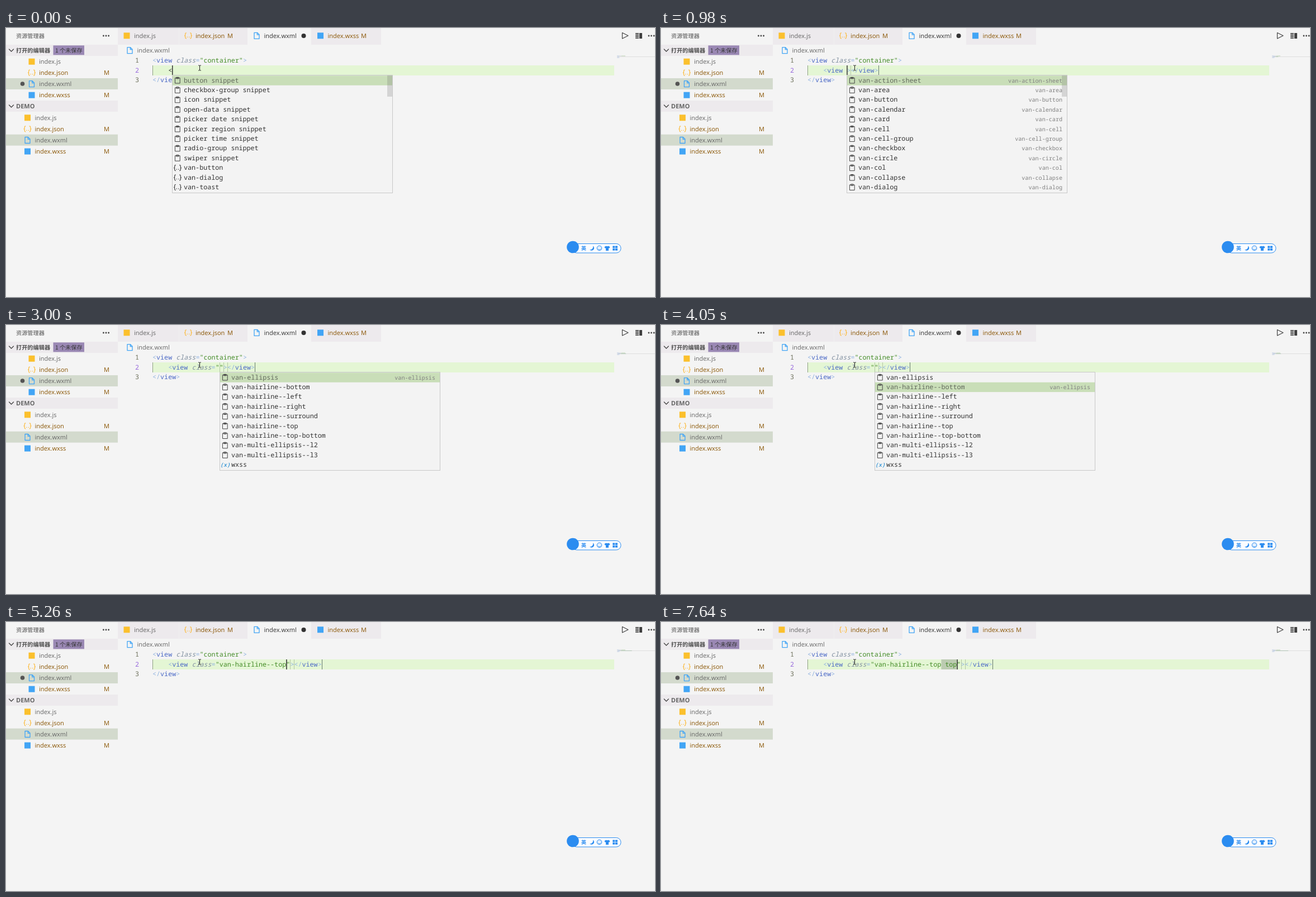
Recreate the animation shown at these times as an HTML page. Size 1161 by 482 pixels, loop 8 s.

```html
<!DOCTYPE html>
<html lang="zh">
<head>
<meta charset="utf-8">
<title>Editor completion</title>
<style>
html, body { margin: 0; width: 100%; height: 100%; overflow: hidden; background: #f4f4f4; }
svg { display: block; width: 1161px; height: 482px; }
text { white-space: pre; text-rendering: geometricPrecision; }
.ui { font: 11px "Open Sans", "Noto Sans", sans-serif; fill: #666; }
.cjk { font: 10.2px "Noto Sans CJK SC", "Noto Sans CJK", sans-serif; fill: #505050; }
.mono { font: 11.73px "Noto Sans Mono", "DejaVu Sans Mono", monospace; fill: #333; }
.detail { font-size: 10.1px; fill: #808080; text-anchor: end; }
.git { fill: #895503; }
.dark { fill: #333; }
.bold { font-weight: 700; }
.mid { text-anchor: middle; }
.punct { fill: #91b3e0; }
.tag { fill: #4b69c6; }
.attr { fill: #8190a0; font-style: italic; }
.str { fill: #448c27; }
.num { fill: #6d705b; }
.active { fill: #9769dc; }
.focus { fill: #62695c; }
.match { fill: #9769dc; font-weight: 700; }
.value { font-size: 10px; font-style: italic; fill: #007acc; }
.ime { font-size: 9px; font-weight: 700; fill: #2b8cf0; }
</style>
</head>
<body>
<svg viewBox="0 0 1161 482"><g id="chrome"></g><g id="editor"></g></svg>
<script>
const LOOP = 8000, CHAR = 7.04, LEFT = 262, ROW = 17.41, POPUP_TOP = 85.3;
const colX = col => LEFT + col * CHAR;

// Drawing helpers
const esc = s => s.replace(/&/g, '&amp;').replace(/</g, '&lt;');
const text = (x, y, s, cls) => `<text x="${x}" y="${y}" class="${cls}">${esc(s)}</text>`;
const rect = (x, y, w, h, fill, more = '') =>
  `<rect x="${x}" y="${y}" width="${w}" height="${h}" fill="${fill}" ${more}/>`;
const circle = (x, y, r, fill) => `<circle cx="${x}" cy="${y}" r="${r}" fill="${fill}"/>`;
const line = (d, color, width = 1.1) =>
  `<path d="${d}" fill="none" stroke="${color}" stroke-width="${width}" stroke-linecap="round" stroke-linejoin="round"/>`;
const at = (x, y, body) => `<g transform="translate(${x} ${y})">${body}</g>`;
const dots = (x, y) => [-4.6, 0, 4.6].map(d => circle(x + d, y, 1.4, '#424242')).join('');

const BRACE = 'M-3.6-5q-1.7 0-1.7 1.8v1.4q0 1.8-1.2 1.8q1.2 0 1.2 1.8v1.4q0 1.8 1.7 1.8';
const braces = color => line(BRACE, color, 1.2) +
  `<g transform="scale(-1 1)">${line(BRACE, color, 1.2)}</g>` +
  line('M-1.8 2.5h.1M1.7 2.5h.1', color, 1.4);

const icons = {
  js: rect(-5.5, -5.5, 11, 11, '#fbc02d'),
  json: braces('#fbbb3c'),
  wxss: rect(-5.5, -5.5, 11, 11, '#42a5f5'),
  wxml: line('M-4.5-5.5h5.5l3.5 3.5v7.5h-9zM.8-5.3v3.7h3.5', '#42a5f5', 1.3),
  clip: line('M-4.2-4.5h8.4v9.5h-8.4zM-2-5.6h4v2.4h-4z', '#424242', 1),
  tag: braces('#424242'),
  cube: line('M0-5.4l5 2.5v5.6l-5 2.7l-5-2.7v-5.6zM-5-2.9l5 2.5l5-2.5M0-.4v5.8', '#007acc', 1.2),
  value: text(0, 3.6, '(x)', 'mono mid value'),
};

// Fixed window parts
const fileColor = name => /json|wxss/.test(name) ? 'git' : '';
const fileRow = (name, x, y, cls = '') => at(x, y, icons[name.split('.')[1]]) +
  text(x + 13, y + 4, name, `ui ${fileColor(name)} ${cls}`);
const chevron = y => line(`M5.5 ${y - 2}l4 4l4-4`, '#424242', 1.3);

function drawChrome() {
  const files = ['index.js', 'index.json', 'index.wxml', 'index.wxss'];
  const header = '#edeaed', selected = '#d3dacd';
  let out = '';
  for (const y of [30, 130]) out += rect(0, y, 200, 20, header) + chevron(y + 10);
  for (const y of [90, 190.7]) out += rect(0, y, 200, 20, selected);
  out += text(18, 17.5, '资源管理器', 'cjk') + dots(179, 14);
  out += text(18, 44, '打开的编辑器', 'cjk bold') + rect(84.5, 31.3, 55.5, 17, '#9a88b4');
  out += text(88, 44, '1 个未保存', 'cjk dark') + text(18, 144, 'DEMO', 'ui bold');
  files.forEach((name, i) => {
    for (const [x, y] of [[46, 60.2 + i * 20], [38.5, 160.8 + i * 20.1]]) {
      out += fileRow(name, x, y);
      if (fileColor(name)) out += text(180, y + 4, 'M', 'ui git mid');
    }
  });
  out += circle(29.5, 100, 3.8, '#555');

  for (const [x, w] of [[200, 109.5], [310, 122], [546, 125]]) out += rect(x, 0, w, 30, header);
  [216, 326, 448.5, 562.5].forEach((x, i) =>
    out += fileRow(files[i], x, 13.8, i === 2 ? 'dark' : ''));
  out += text(401, 17.8, 'M', 'ui git mid') + text(640, 17.8, 'M', 'ui git mid');
  out += circle(532.5, 14, 4, '#333') + fileRow('index.wxml', 221.5, 40.2);

  out += line('M1102.5 8.5v10.5l10.5-5.2z', '#424242', 1.2);
  for (const y of [9, 11.7, 14.4, 17.1]) out += rect(1126, y, 6, 1.7, '#424242');
  out += rect(1133, 9, 5, 10, '#424242') + dots(1154.5, 14);

  const blue = '#2b8cf0';
  out += rect(1012.5, 386.5, 87.5, 16.5, '#fafcff', `rx="8.2" stroke="${blue}"`) + circle(1014, 392.5, 10.8, blue);
  out += text(1033.5, 398, '英', 'cjk mid ime');
  out += `<path d="M1050 390.5a4.5 4.5 0 1 1-6 6.5a5 5 0 0 0 6-6.5z" fill="${blue}"/>`;
  out += line('M1057.3 394.5a4.2 4.2 0 1 1 8.4 0a4.2 4.2 0 1 1-8.4 0M1059.3 396q2.2 2.4 4.4 0M1060 393h.1M1063 393h.1', blue);
  out += `<path d="M1073.5 390.5q2 1.5 4 0l3 1.8l-1.2 2.5l-1.3-.5v4.7h-5v-4.7l-1.3.5l-1.2-2.5z" fill="${blue}"/>`;
  for (const x of [1085.3, 1090]) for (const y of [390.5, 395]) out += rect(x, y, 4, 3.7, blue);
  return out;
}

// Completion lists
const items = (icon, names) => names.split(' ').map(name => ({ icon, name }));
const views = 'view web-view cover-view picker-view picker-view-column scroll-view movable-view';
const snippets = [
  ...['button', 'checkbox-group', 'icon', 'open-data', 'picker date', 'picker region', 'picker time',
    'radio-group', 'swiper'].map(name => ({ icon: 'clip', name: name + ' snippet' })),
  ...items('tag', 'van-button van-dialog van-toast')];
const attributes = items('clip', 'van-action-sheet van-area van-button van-calendar van-card van-cell ' +
  'van-cell-group van-checkbox van-circle van-col van-collapse van-dialog');
const cList = [...items('clip', 'van-calendar van-card van-cell van-cell-group van-checkbox ' +
  'van-checkbox-group van-circle van-col van-collapse van-collapse-item van-swipe-cell'), ...items('cube', 'class')];
const clList = [...items('clip', 'van-calendar van-cell van-cell-group van-col van-collapse van-collapse-item ' +
  'van-circle van-swipe-cell'), ...items('cube', 'class hover-class aria-controls')];
const claList = [...items('cube', 'class hover-class'), ...items('clip', 'van-calendar van-collapse van-collapse-item')];
const classNames = [...items('clip', 'van-ellipsis van-hairline--bottom van-hairline--left van-hairline--right ' +
  'van-hairline--surround van-hairline--top van-hairline--top-bottom van-multi-ellipsis--l2 van-multi-ellipsis--l3'),
  ...items('value', 'wxss')];
const loading = [{ name: '正在加载...' }];

const view = attrs => `<view ${attrs}></view>`;
const topClass = (extra = '') => view(`class="van-hairline--top${extra}"`);

// Each step changes the state left by the one before it
const steps = [
  [0, { code: '<', col: 5, caret: true, list: snippets, query: '', sel: 0, scroll: true,
        broken: false, tail: [], hold: null, detail: '' }],
  [150, { code: '<v', col: 6, query: 'v', broken: true,
          list: items('tag', 'view video van-button van-dialog van-toast navigator ' + views.slice(5)) }],
  [275, { code: '<vi', col: 7, query: 'vi',
          list: items('tag', 'view video van-dialog navigator van-divider van-switch ' + views.slice(5)) }],
  [400, { code: '<vie', col: 8, query: 'vie', scroll: false, list: items('tag', views + ' van-divider') }],
  [550, { code: '<view', col: 9, query: 'view', list: items('tag', views) }],
  [830, { code: view(''), col: 10, list: null, tail: [7, 0] }],
  [980, { list: attributes, query: '', scroll: true, broken: false, detail: 'all' }],
  [1380, { code: view('c'), col: 11, query: 'c', list: cList, hold: 10 }],
  [1630, { code: view('cl'), col: 12, query: 'cl', list: clList, scroll: false }],
  [1750, { code: view('cla'), col: 13, query: 'cla', list: claList }],
  [1870, { code: view('class'), col: 15, query: 'class', list: items('cube', 'class hover-class') }],
  [2400, { caret: false }],
  [2550, { code: view('class=""'), col: 17, caret: true, query: '', list: classNames,
           hold: null, tail: [9, 8, 7, 0], detail: 'van-ellipsis' }],
  [3000, { caret: false }],
  [3530, { caret: true }],
  [4050, { caret: false, sel: 1 }],
  [4450, { caret: true, sel: 2 }],
  [4730, { sel: 3 }],
  [4850, { sel: 4 }],
  [4990, { caret: false, sel: 5 }],
  [5260, { code: topClass(), col: 34, caret: true, list: null }],
  [5690, { col: 35 }],
  [5950, { col: 36 }],
  [6380, { col: 35 }],
  [6530, { col: 34 }],
  [6800, { code: topClass(' '), col: 35, list: loading, sel: -1, hold: 34, tail: [8, 7, 0] }],
  [7080, { code: topClass(' t'), col: 36, list: null }],
  [7640, { code: topClass(' top'), col: 38 }],
];
let last = {};
const states = steps.map(([time, change]) => last = { ...last, ...change, time });

function drawCode(code, startCol, y, broken) {
  let out = '', opened = false;
  for (const { 0: s, index } of code.matchAll(/<\/?|[>=]|"[^"]*"?|[\w-]+/g)) {
    const kind = code === '<' ? '' : /[<>=]/.test(s[0]) ? 'punct' : s[0] === '"' ? 'str'
      : opened && !broken ? 'tag' : 'attr';
    out += text(colX(startCol + index), y, s, 'mono ' + kind);
    opened = s[0] === '<';
  }
  return out;
}

// Indices of the letters in name that match the query
function matchLetters(name, query) {
  const whole = name.indexOf(query);
  if (whole >= 0) return [...query].map((_, i) => whole + i);
  let from = -1;
  return [...query].map(ch => from = name.indexOf(ch, from + 1));
}

function drawPopup({ list, col, query, sel, scroll, detail }) {
  const x = Math.round(colX(col)), message = list === loading;
  const h = Math.round(list.length * ROW + 2);
  let out = rect(x + .5, 84.5, 394, h, '#f3f3f3', 'stroke="#c8c8c8"');
  list.forEach(({ icon, name }, i) => {
    const y = POPUP_TOP + i * ROW, base = y + 12.3, left = x + (icon ? 21 : 5);
    const plain = i === sel ? 'mono focus' : 'mono';
    if (i === sel) out += rect(x + 1, y, 393, ROW, '#c9deb8');
    if (icon) out += at(x + 10, y + 8.7, icons[icon]);
    if (message) out += text(left, base, name, 'cjk');
    else if (!query) out += text(left, base, name, plain);
    else {
      const hits = matchLetters(name, query);
      [...name].forEach((ch, k) =>
        out += text(left + k * CHAR, base, ch, hits.includes(k) ? 'mono match' : plain));
    }
    const note = detail === 'all' ? (icon === 'clip' ? name : '') : i === sel ? detail : '';
    if (note) out += text(x + 386, base, note, 'mono detail');
  });
  if (scroll) out += rect(x + 385, 85, 9, 38, '#646464', 'opacity=".22"');
  return out;
}

function drawMinimap(code, broken) {
  const strip = (from, count, y, fill) => rect(1093 + from * .62, y, count * .62, 1, fill, 'opacity=".6"');
  return rect(1093, 51, 68, 1, '#dedede') +
    strip(0, 6, 49.5, '#8facd8') + strip(6, 7, 49.5, '#b4bcc5') + strip(13, 11, 49.5, '#97bd86') +
    strip(4, Math.min(code.length, 5), 51, '#8facd8') +
    (code.length > 5 ? strip(10, code.length - 6, 51, '#93b39a') : '') +
    strip(0, 7, 52.5, broken ? '#999' : '#8facd8');
}

function drawEditor(state) {
  const { code, col, caret, list, broken, tail, hold } = state;
  const end = 4 + code.length;
  let out = rect(LEFT, 67, 826, 18, '#e4f6d4') + rect(LEFT, 67, 1, 18, '#8fa184');
  [62, 79.5, 97].forEach((y, i) =>
    out += text(231, y, String(i + 1), 'mono ' + (i === 1 ? 'active' : 'num')));
  if (hold !== null) out += rect(colX(hold), 67, (col - hold) * CHAR, 18, '#bccbb1');
  for (const back of tail)
    out += rect(Math.round(colX(end - back)), 67, 1, 18, back ? '#b3c6a6' : '#667a70');
  out += drawCode('<view class="container">', 0, 62) + drawCode(code, 4, 79.5) + drawCode('</view>', 0, 97, broken);
  if (caret) out += rect(colX(col) - .2, 67, 1.5, 18, '#333');
  out += drawMinimap(code, broken);
  if (list) out += drawPopup(state);
  return out + line('M344.5 67h1.5l.5.5l.5-.5h1.5M346.5 67.5v8M344.5 76h1.5l.5-.5l.5.5h1.5', '#222', 1);
}

const editor = document.getElementById('editor');
document.getElementById('chrome').innerHTML = drawChrome();
let shown = null;
function tick() {
  const time = performance.now() % LOOP;
  const state = states.findLast(s => s.time <= time);
  if (state !== shown) editor.innerHTML = drawEditor(shown = state);
  requestAnimationFrame(tick);
}
tick();
</script>
</body>
</html>
```
